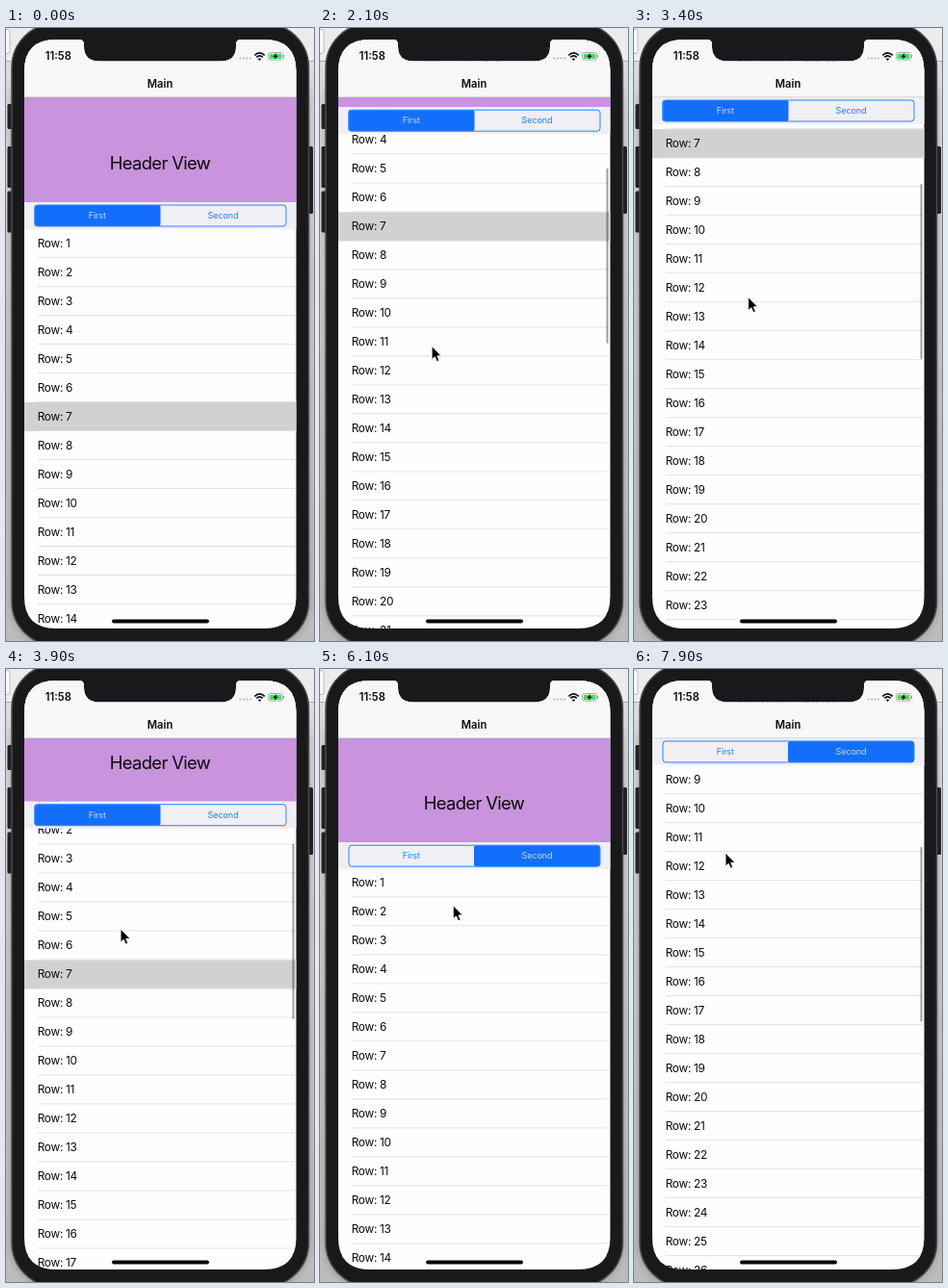
Recreate the animation shown at these times as an HTML page. Size 320 by 637 pixels, loop 8 s.

```html
<!DOCTYPE html>
<html lang="en">
<head>
<meta charset="utf-8">
<title>Collapsing header</title>
<style>
  html, body { margin: 0; width: 100%; height: 100%; overflow: hidden; background: #d4d4d4; }
  svg { display: block; width: 100%; height: 100%; }
  text { font-family: Inter, "Liberation Sans", sans-serif; fill: #0a0a0a; }
  .row { font-size: 11.9px; letter-spacing: -.3px; }
  .head { font-size: 18.4px; letter-spacing: -.65px; text-anchor: middle; }
  .bold { font-size: 11.2px; font-weight: 600; text-anchor: middle; }
  .seg { font-size: 9px; letter-spacing: -.1px; text-anchor: middle; }
</style>
</head>
<body>
<svg viewBox="0 0 320 637" preserveAspectRatio="none">
  <defs>
    <linearGradient id="desk" x2="0" y2="1">
      <stop offset="0" stop-color="#dedede"/>
      <stop offset=".3" stop-color="#d2d2d2"/>
      <stop offset="1" stop-color="#bcbcbc"/>
    </linearGradient>
    <filter id="soft"><feGaussianBlur stdDeviation="5"/></filter>
    <clipPath id="screen">
      <path d="M52 12H76Q81 12 81 17V19Q81 34.500 97 34.500H223Q239 34.500 239 19V17Q239 12 244 12H268Q301.500 12 301.500 45V591Q301.500 624 268 624H52Q19 624 19 591V45Q19 12 52 12Z"/>
    </clipPath>
  </defs>

  <rect width="320" height="637" fill="url(#desk)"/>
  <rect width="320" height="34" fill="#ececec"/>
  <path d="M0 34.500H320" stroke="#a9a9a9"/>
  <rect x="-8" y="1.500" width="12" height="25" rx="2" fill="#fafafa" stroke="#bdbdbd"/>
  <rect x="6" y="30" width="308" height="612" rx="46" opacity=".3" filter="url(#soft)"/>

  <g fill="#202022">
    <rect x="1.500" y="79" width="6" height="26" rx="1.500"/>
    <rect x="1.500" y="123" width="6" height="43" rx="1.500"/>
    <rect x="1.500" y="169.500" width="6" height="43" rx="1.500"/>
    <rect x="313" y="123" width="6" height="70" rx="1.500"/>
  </g>
  <rect x="6" y="-5" width="308.500" height="647" rx="46" fill="#19191b" stroke="#4a4a4d" stroke-width="1.500"/>

  <g clip-path="url(#screen)">
    <rect x="19" y="12" width="283" height="613" fill="#fffeff"/>
    <rect id="mark" x="19" y="389" width="283" height="30" fill="#d1d1d1"/>
    <g id="list"></g>
    <rect id="thumb" x="297.500" width="2" height="182" rx="1"/>
    <g id="header">
      <rect x="19" y="72" width="283" height="109" fill="#c993dd"/>
      <text class="head" x="160" y="147.300">Header View</text>
      <rect x="19" y="181" width="283" height="28" fill="#efeff4"/>
      <rect id="pick" y="184" width="131" height="22" rx="2" fill="#136ffb"/>
      <rect x="30" y="184" width="261" height="22" rx="3" fill="none" stroke="#2d84f7"/>
      <text class="seg" id="tab1" x="94.800" y="198.300">First</text>
      <text class="seg" id="tab2" x="225.500" y="198.300">Second</text>
    </g>
    <rect x="19" y="12" width="283" height="60" fill="#f8f7f9"/>
    <path d="M19 71.700H302" stroke="#c4c0c8" stroke-width=".6"/>
    <text class="bold" x="160" y="61.500">Main</text>
    <text class="bold" x="54.300" y="33">11:58</text>
    <path d="M243.500 31.500H254.500" stroke="#b8b8bb" stroke-width="2.200" stroke-linecap="round" stroke-dasharray="0 3.500"/>
    <g fill="none" stroke="#0a0a0a" stroke-width="1.700">
      <path d="M258.300 28.300Q263.500 23.500 268.700 28.300"/>
      <path d="M260.300 30.400Q263.500 27.300 266.700 30.400"/>
    </g>
    <path d="M263.500 34L261.800 32.100Q263.500 30.800 265.200 32.100Z"/>
    <rect x="272.500" y="25.500" width="15" height="7.600" rx="2" fill="#fff" stroke="#9a9a9d" stroke-width=".8"/>
    <rect x="273.700" y="26.700" width="12.600" height="5.200" rx="1" fill="#4cd964"/>
    <path d="M288.600 28V30.800" stroke="#9a9a9d"/>
    <path d="M281.200 25.800L277.200 29.900H279.700L278.700 33L282.800 28.700H280.300Z" fill="#0a0a0a"/>
    <rect x="110" y="614.500" width="101" height="4" rx="2" fill="#050505"/>
  </g>

  <path id="cursor" d="M0 0V14.200L3.200 11.300L5.400 16.200L7.900 15.100L5.800 10.300H10.200Z"
        stroke="#fff" stroke-linejoin="round"/>
</svg>

<script>
const LOOP = 8000, STEP = 100, SWITCH = 5900, FLICK = 6350;
const ROWS = 50, ROW_H = 30, LIST_Y = 209, HEADER_H = 109;
const $ = id => document.getElementById(id);

// Pointer stops: time, x, y
const stops = [
  [100, 150, 465], [900, 113, 349], [1500, 111, 306], [2300, 117, 335],
  [2800, 118, 292], [3900, 119, 270], [5000, 157, 235], [5700, 222, 192],
  [FLICK, 97, 272], [6800, 94, 198], [7900, 95, 191]
];

// Smooth rise from 0 to 1 between two times
function ease(t, from, to) {
  const p = Math.min(1, Math.max(0, (t - from) / (to - from)));
  return p * p * (3 - 2 * p);
}

// Slow drag, flick down the list, pull back to the top, then a decaying flick
function scrollAt(t) {
  const decay = 1 - Math.exp(-Math.max(0, t - FLICK) / 460);
  return 98.8 * ease(t, 1000, 2100) + 132.4 * ease(t, 2300, 3000)
    - 230.4 * ease(t, 3000, 4240) + 247.6 * decay;
}

function thumbAlpha(t) {
  return 0.38 * (ease(t, 900, 1100) - ease(t, 4500, 4900) + ease(t, FLICK, 6450));
}

function pointerAt(t) {
  const i = Math.max(1, stops.findIndex(s => s[0] >= t));
  const [t0, x0, y0] = stops[i - 1], [t1, x1, y1] = stops[i];
  const p = ease(t, t0, t1);
  return [x0 + (x1 - x0) * p, y0 + (y1 - y0) * p];
}

function fillList() {
  let out = "";
  for (let n = 1; n <= ROWS; n++) {
    const y = LIST_Y + (n - 1) * ROW_H;
    out += `<path stroke="#e1e1e4" d="M33 ${y + 29.5}H302"/>`
      + `<text class="row" x="32.700" y="${y + 19}">Row: ${n}</text>`;
  }
  $("list").innerHTML = out;
}

function show(id, on) {
  $(id).setAttribute("visibility", on ? "visible" : "hidden");
}

function move(id, x, y) {
  $(id).setAttribute("transform", `translate(${x} ${y})`);
}

function draw(t) {
  const scroll = scrollAt(t);
  const lift = Math.min(HEADER_H, scroll);
  const second = t >= SWITCH;

  show("mark", !second);
  move("mark", 0, -lift - scroll);
  move("list", 0, -lift - scroll);
  move("header", 0, -lift);

  $("pick").setAttribute("x", second ? 160 : 29.5);
  $("tab1").style.fill = second ? "#2380f7" : "#c0d8ff";
  $("tab2").style.fill = second ? "#c0d8ff" : "#2380f7";

  $("thumb").setAttribute("y", LIST_Y + 1 - lift + scroll * 0.349);
  $("thumb").setAttribute("opacity", thumbAlpha(t));

  show("cursor", t >= STEP);
  move("cursor", ...pointerAt(t));
}

fillList();

const start = performance.now();
function tick() {
  const t = (performance.now() - start) % LOOP;
  draw(Math.floor(t / STEP) * STEP);
  requestAnimationFrame(tick);
}
tick();
</script>
</body>
</html>
```
